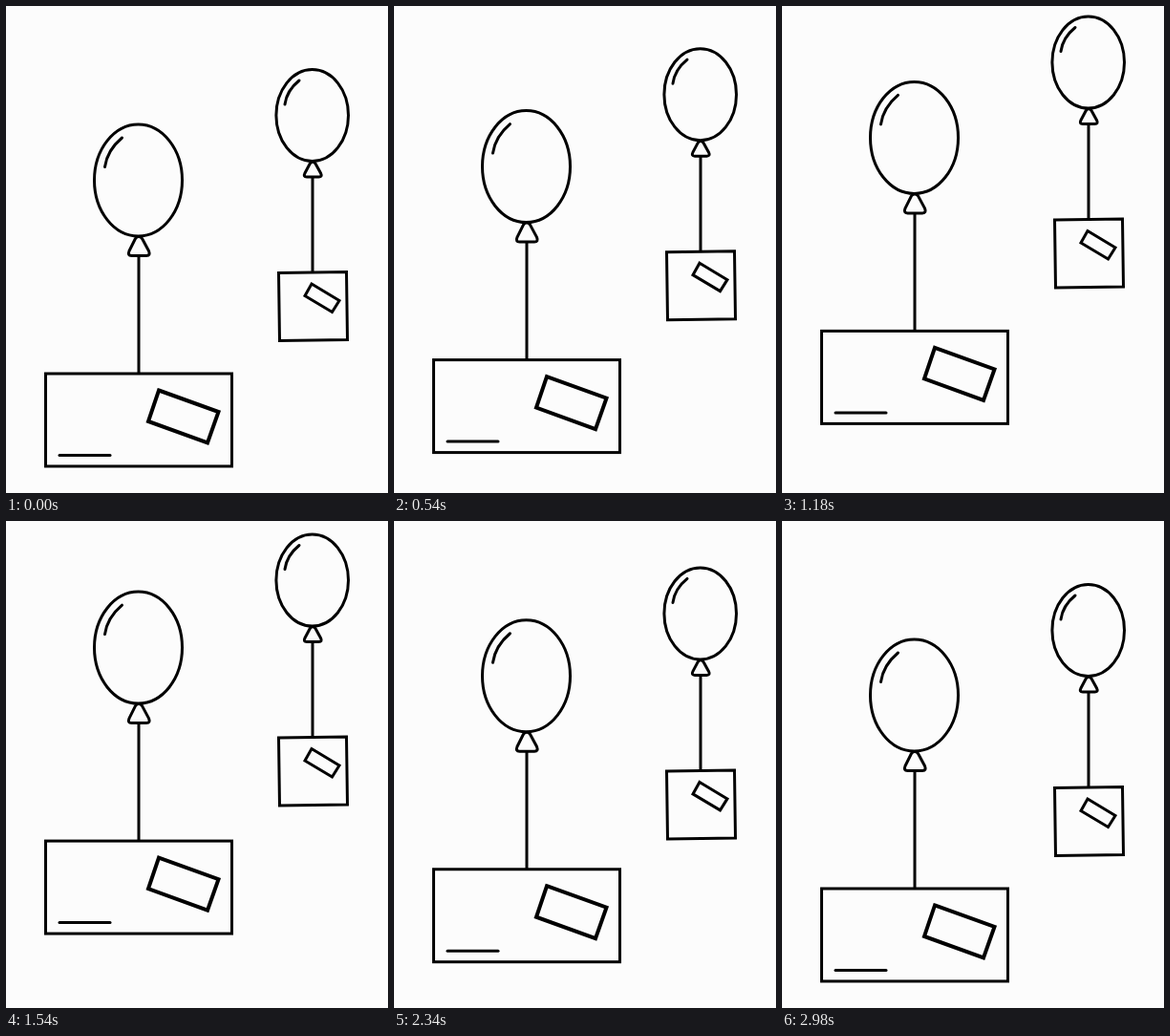
An HTML page that plays this animation: 400 px wide and 510 px high, repeating every 3000 ms.

```html
<!DOCTYPE html>
<html lang="en">
<head>
<meta charset="utf-8">
<title>Floating parcels</title>
<style>
  html, body { margin: 0; width: 100%; height: 100%; overflow: hidden; background: #fcfcfc; }
  svg { display: block; width: 400px; height: 510px; }
  g { fill: none; stroke: #000; stroke-width: 3; }
  .round { stroke-linecap: round; stroke-linejoin: round; }
</style>
</head>
<body>
<svg viewBox="0 0 400 510">
  <g id="letter">
    <ellipse cx="138.5" cy="182.5" rx="46" ry="58.5"/>
    <path class="round" d="M103.5 168.5Q106 151 121.5 138"/>
    <path class="round" d="M135.5 243.5L129 256.5Q127 261.5 131.5 261.5H147Q151.500 261.500 149.500 256.500L142.500 243.500Q139 239.500 135.500 243.500Z"/>
    <path d="M139 262V385"/>
    <rect x="41.5" y="385" width="195" height="97"/>
    <path class="round" d="M56 470.5H109"/>
    <path stroke-width="4" d="M160 402.500L222.500 425L211 457.500L149 435Z"/>
  </g>
  <g id="parcel">
    <ellipse cx="320.7" cy="114.5" rx="37.8" ry="48"/>
    <path class="round" d="M292 103Q294 88.500 307 78"/>
    <path class="round" d="M318.300 165L313 175Q311 179 315 179H327.500Q331.500 179 329.500 175L324 165Q321 161.500 318.300 165Z"/>
    <path d="M321 179V279"/>
    <path d="M285.500 279.500L356.500 278.500L357.500 349.500L286.500 350.500Z"/>
    <path d="M320 291L349 308.500L341.500 320.500L313 303.500Z"/>
  </g>
</svg>
<script>
  const LOOP = 3000;
  // rise: height in px, peak: time of the highest point in ms
  const floaters = [
    { id: "letter", rise: 50, peak: 1500 },
    { id: "parcel", rise: 56, peak: 1260 }
  ].map(f => ({ ...f, el: document.getElementById(f.id) }));

  const ease = p => (1 - Math.cos(Math.PI * p)) / 2;

  function lift(t, { rise, peak }) {
    const p = t < peak ? t / peak : (LOOP - t) / (LOOP - peak);
    return rise * ease(p);
  }

  function draw() {
    const t = performance.now() % LOOP;
    for (const f of floaters) {
      f.el.setAttribute("transform", `translate(0 ${-lift(t, f).toFixed(3)})`);
    }
    requestAnimationFrame(draw);
  }
  draw();
</script>
</body>
</html>
```
